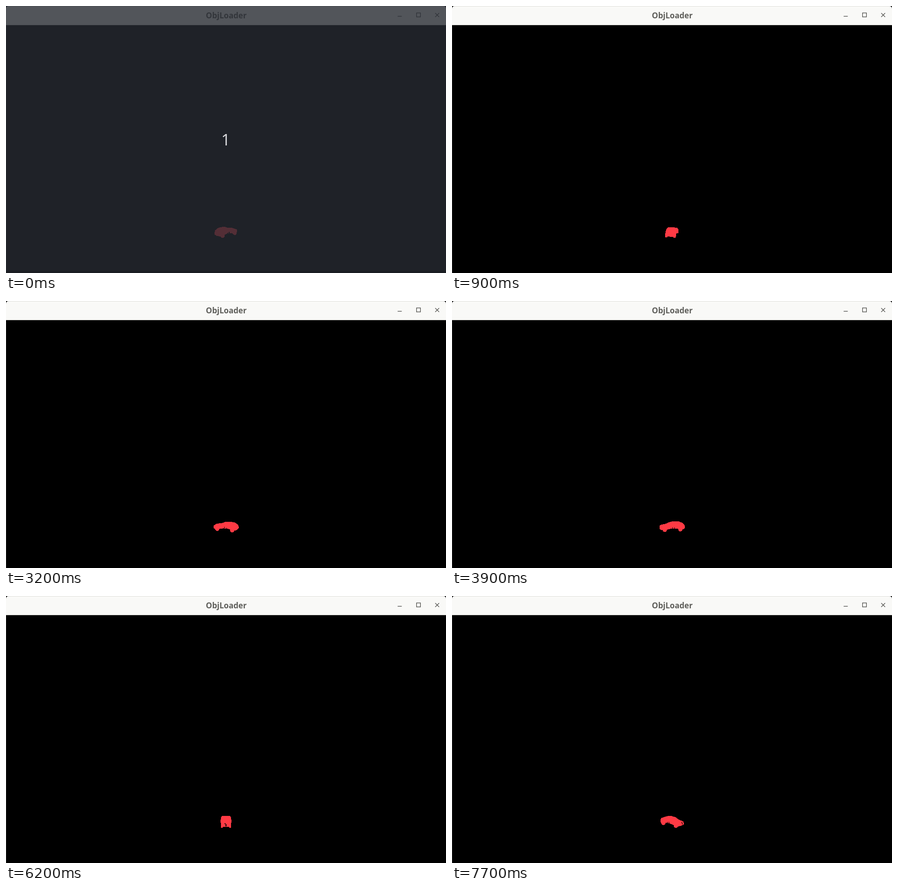
An HTML page that plays this animation: 960x584 px, repeating every 7800 ms.

```html
<!DOCTYPE html>
<html lang="en">
<head>
<meta charset="utf-8">
<title>ObjLoader</title>
<style>
  html, body { margin: 0; width: 100%; height: 100%; overflow: hidden; background: #000; }
  svg { display: block; width: 960px; height: 584px; }
  text { font-family: "Open Sans", "Noto Sans", sans-serif; text-anchor: middle; }
</style>
</head>
<body>
<svg viewBox="0 0 960 584">
  <rect width="960" height="584" fill="#000"/>
  <rect y="42" width="1" height="542" fill="#242424"/>
  <path d="M0 42V6Q0 0 6 0H954Q960 0 960 6V42Z" fill="#f9f9f7"/>
  <path d="M6 .5H954" stroke="#dededb"/>
  <path d="M0 41.5H960" stroke="#c9c9c6"/>
  <text x="480.5" y="26.5" font-size="17.1" font-weight="700" fill="#5f5f5b">ObjLoader</text>
  <g fill="none" stroke="#555552" stroke-width="1.4">
    <path d="M854.5 22.5H863.5"/>
    <rect x="895.7" y="15.2" width="8.6" height="8.6"/>
    <path d="M936.5 15.5L945 24M945 15.5L936.5 24"/>
  </g>
  <path id="car" fill="#ff3a44" shape-rendering="crispEdges"/>
  <path id="gaps" fill="none" stroke="#000" stroke-width="1.4" shape-rendering="crispEdges"/>
  <g id="countdown">
    <rect width="960" height="584" fill="#272b33" opacity=".795"/>
    <rect y="579" width="960" height="5" fill="#14171c" opacity=".45"/>
    <text x="479.5" y="305" font-size="35" fill="#dcdcdf">1</text>
  </g>
</svg>
<script>
const LOOP = 7800, STEP = 100, TURN = 10000, REAR_VIEW = 1200;
const FOCAL = 647, CENTER_X = 480, HORIZON = 311, GROUND = 190.5;

// Cross-sections from nose to tail: position, underside, half width, top, half width of the top
const stations = [
  [-27, 5, 6, 9, 5.5], [-24, 4, 9, 10.5, 8], [-12, 5, 11, 12.5, 9],
  [-3, 7, 11.5, 16.5, 8.5], [8, 7, 11.5, 17, 9.5], [17, 5, 11, 16, 9.5],
  [24, 4, 9, 13.5, 7.5], [27, 5, 6, 11, 5]
];

const section = ([u, low, wide, high, roof]) => [-1, 1].flatMap(side => [
  [u, side * wide, low],
  [u, side * wide, low + (high - low) * 0.55],
  [u, side * roof, high]
]);

const wheel = (u, side) => [7, 11].flatMap(v =>
  Array.from({ length: 12 }, (_, i) => {
    const a = i * Math.PI / 6;
    return [u + 4.5 * Math.cos(a), side * v, 4.5 + 4.5 * Math.sin(a)];
  }));

const solids = stations.slice(1).map((s, i) => [...section(stations[i]), ...section(s)]);
for (const u of [-17, 17]) for (const side of [-1, 1]) solids.push(wheel(u, side));

// Dark slits: lower and upper point, and the direction they face
const slits = [];
for (const side of [-1, 1]) {
  slits.push({ from: [0, side * 11, 7], to: [0, side * 11, 10], facing: [0, side] });
  slits.push({ from: [4, side * 11, 6], to: [4, side * 11, 9], facing: [0, side] });
}
slits.push({ from: [-27, 0, 6], to: [-27, 0, 10], facing: [-1, 0] });
slits.push({ from: [-27, 2, 10], to: [-27, 2, 12], facing: [-1, 0] });

const nearness = (u, v, a) => u * Math.cos(a) - v * Math.sin(a);

function project([u, v, h], a) {
  const scale = FOCAL / (FOCAL - nearness(u, v, a));
  const x = u * Math.sin(a) + v * Math.cos(a);
  return [CENTER_X + x * scale, HORIZON + (GROUND - h) * scale];
}

function hull(points) {
  const sorted = points.slice().sort((p, q) => p[0] - q[0] || p[1] - q[1]);
  const chain = list => {
    const out = [];
    for (const p of list) {
      while (out.length > 1) {
        const [o, q] = out.slice(-2);
        if ((q[0] - o[0]) * (p[1] - o[1]) - (q[1] - o[1]) * (p[0] - o[0]) > 0) break;
        out.pop();
      }
      out.push(p);
    }
    return out.slice(0, -1);
  };
  return [...chain(sorted), ...chain(sorted.reverse())];
}

const line = points => "M" + points.map(p => p.map(n => n.toFixed(2)).join(" ")).join("L");
const car = document.getElementById("car");
const gaps = document.getElementById("gaps");
const countdown = document.getElementById("countdown");

function render(ms) {
  const time = Math.floor((ms % LOOP) / STEP) * STEP;
  const pose = time || -200;
  const a = (pose - REAR_VIEW) / TURN * 2 * Math.PI;
  const place = p => project(p, a);
  car.setAttribute("d", solids.map(s => line(hull(s.map(place))) + "Z").join(""));
  gaps.setAttribute("d", slits
    .filter(s => nearness(...s.facing, a) > 0.55)
    .map(s => line([place(s.from), place(s.to)])).join(""));
  countdown.style.display = time ? "none" : "";
}

const start = performance.now();
function tick() {
  render(performance.now() - start);
  requestAnimationFrame(tick);
}
tick();
</script>
</body>
</html>
```
